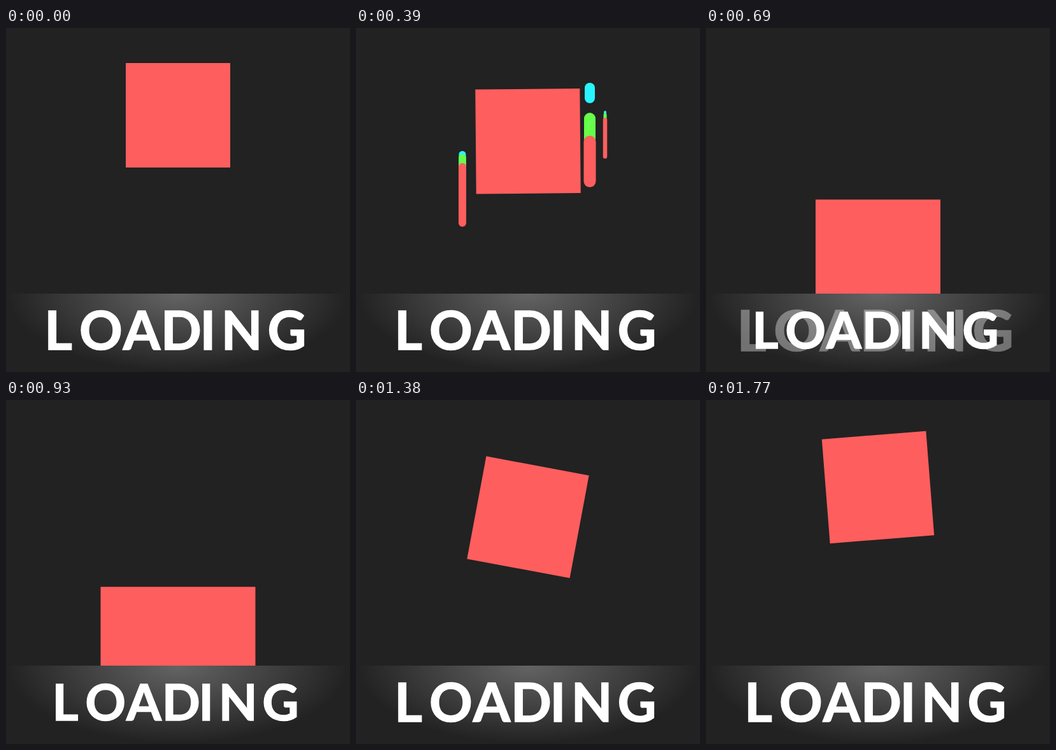
Write an HTML page that moves like this. It is 540 px wide and 540 px high and loops after 1800 ms.

```html
<!DOCTYPE html>
<html lang="en">
<head>
<meta charset="utf-8">
<title>Loading</title>
<style>
  html, body { margin: 0; width: 100%; height: 100%; overflow: hidden; background: #222; }
  svg { display: block; width: 100vw; height: 100vh; }
  text {
    font: 700 84px Lato, "Open Sans", sans-serif;
    fill: #fff; stroke: #fff; stroke-width: 1.6px; text-anchor: middle;
  }
</style>
</head>
<body>
<svg viewBox="0 0 540 540">
  <defs>
    <radialGradient id="glow" gradientUnits="userSpaceOnUse" cx="0" cy="0" r="1"
      gradientTransform="translate(270 417) scale(268 122)">
      <stop offset="0" stop-color="#646464"/>
      <stop offset="1" stop-color="#222"/>
    </radialGradient>
    <text id="word" x="82 149 213 275 317 370 441" y="505">LOADING</text>
  </defs>
  <rect width="540" height="540" fill="#222"/>
  <rect y="417" width="540" height="123" fill="url(#glow)"/>
  <g id="streaks" stroke-linecap="round"></g>
  <rect id="box" x="-82" y="-82" width="164" height="164" fill="#ff5e5e"/>
  <use id="ghost" href="#word"/>
  <use id="label" href="#word"/>
</svg>
<script>
const LOOP = 1800, STEP = 30, FLOOR = 417, SIZE = 164, APEX = 137, DROP = 198;
const CYAN = '#29f4ff', GREEN = '#66ff4b', RED = '#ff5e5e';
const $ = id => document.getElementById(id);
const clamp = v => Math.max(0, Math.min(1, v));

// Smooth monotone curve through [time, value] points
function track(points) {
  const slope = points.slice(1).map((p, i) => (p[1] - points[i][1]) / (p[0] - points[i][0]));
  const tangent = points.map((_, i) => {
    const a = slope[i - 1], b = slope[i];
    if (a === undefined) return b;
    if (b === undefined) return a;
    return a * b > 0 ? 2 * a * b / (a + b) : 0;
  });
  return t => {
    if (t <= points[0][0]) return points[0][1];
    const i = points.findIndex(p => p[0] >= t) - 1;
    if (i < 0) return points[points.length - 1][1];
    const [t0, v0] = points[i], [t1, v1] = points[i + 1];
    const d = t1 - t0, u = (t - t0) / d, w = 1 - u;
    return w * w * (1 + 2 * u) * v0 + u * u * (3 - 2 * u) * v1
      + d * u * w * (w * tangent[i] - u * tangent[i + 1]);
  };
}

const angle = track([[0, -90], [165, -49], [390, -0.5], [420, 0], [1095, 0],
  [1140, 2], [1380, 10.6], [1620, 41], [1770, 85.5], [1800, 90]]);
const squash = track([[390, 0], [540, -0.13], [600, -0.03], [690, 0.195], [810, 0.42],
  [915, 0.486], [1020, 0.36], [1140, 0.128], [1230, -0.05], [1350, 0]]);
const labelScale = track([[585, 1], [670, 0.941], [1050, 0.941], [1140, 0.995], [1170, 1]]);

// x, width, top, bottom, colour at the middle of each streak's life
const streaks = [
  [167, 11, 193, 280, CYAN], [167, 11.5, 198, 295, GREEN], [167, 12, 212, 312, RED],
  [367, 16, 86, 118, CYAN], [367, 18, 133, 205, GREEN], [367, 19, 169, 250, RED],
  [391, 4, 130, 180, CYAN], [391, 5, 134, 190, GREEN], [391, 6.5, 141, 205, RED],
].map(([x, width, top, bottom, color]) => {
  const line = document.createElementNS('http://www.w3.org/2000/svg', 'line');
  line.setAttribute('x1', x);
  line.setAttribute('x2', x);
  line.setAttribute('stroke', color);
  $('streaks').append(line);
  return { line, width, mid: (top + bottom) / 2, half: (bottom - top - width) / 2 };
});

function drawStreaks(t) {
  const q = (t - 390) / 120, life = 1 - q * q;
  $('streaks').style.display = life > 0 ? '' : 'none';
  if (life <= 0) return;
  for (const { line, width, mid, half } of streaks) {
    const y = mid - 45 * q;
    line.setAttribute('y1', y - half * life);
    line.setAttribute('y2', y + half * life);
    line.setAttribute('stroke-width', width * Math.sqrt(life));
  }
}

function scaleWord(id, s) {
  $(id).setAttribute('transform', `translate(270 475) scale(${s}) translate(-270 -475)`);
}

function draw(t) {
  const s = squash(t), sy = 1 - 0.51 * s;
  const travel = t < 900 ? (t / 595) ** 3.74 : ((LOOP - t) / 655) ** 3.24;
  const y = Math.min(APEX + DROP * travel, FLOOR - SIZE * sy / 2);
  $('box').setAttribute('transform',
    `translate(270 ${y}) rotate(${angle(t)}) scale(${1 + s} ${sy})`);

  // Shock wave of the word after the landing
  const wave = clamp((t - 600) / 320);
  scaleWord('ghost', 1 + 0.2 * wave);
  $('ghost').setAttribute('opacity', t < 600 ? 0 : 0.5 * (1 - wave));
  scaleWord('label', labelScale(t));
  drawStreaks(t);
}

const start = performance.now();
function frame() {
  const t = (performance.now() - start) % LOOP;
  draw(Math.floor(t / STEP) * STEP);
  requestAnimationFrame(frame);
}
frame();
</script>
</body>
</html>
```
